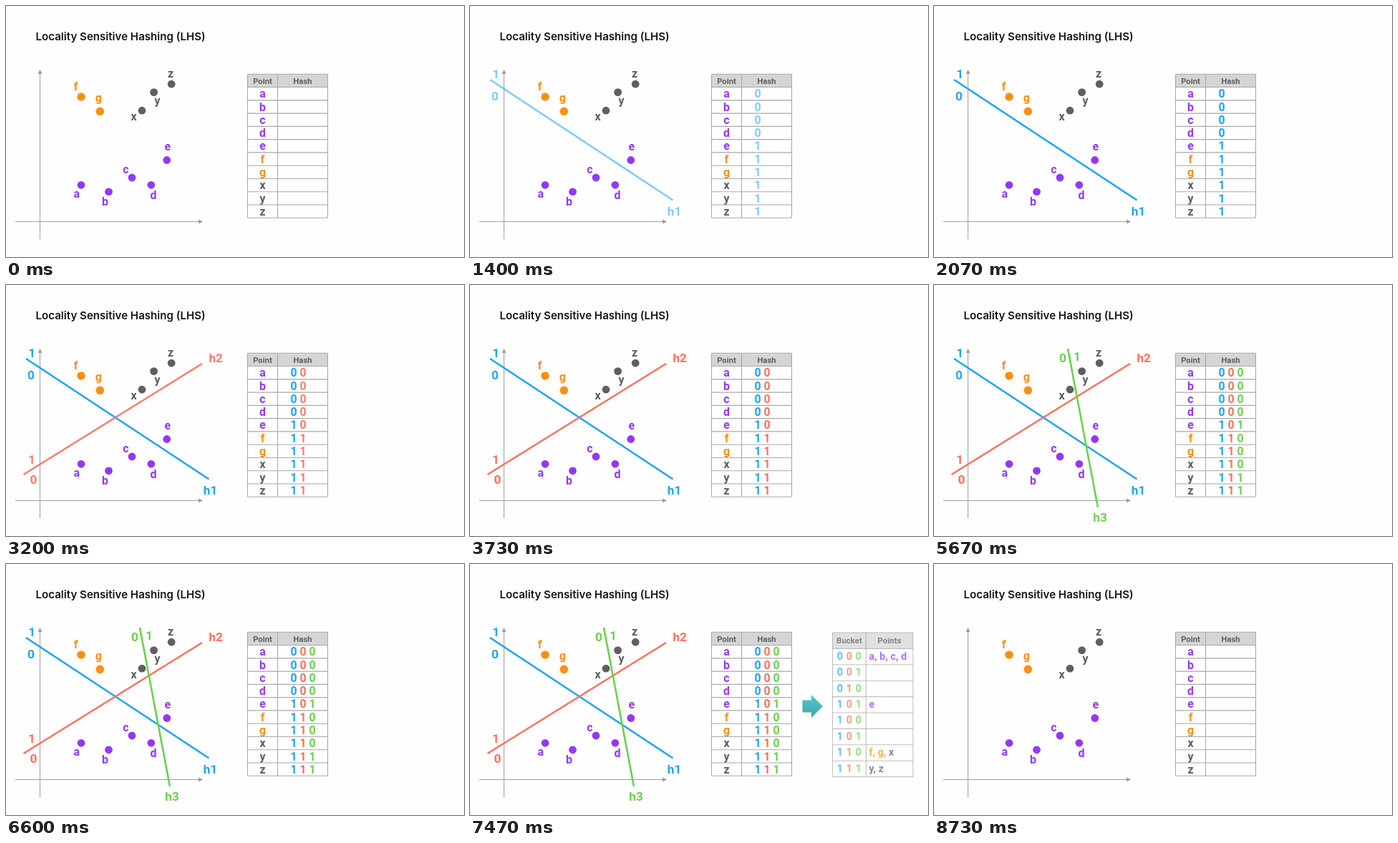
An HTML page with a canvas for the animation above (8790 ms loop, 640 by 351 pixels).

```html
<!DOCTYPE html>
<html lang="en">
<head>
<meta charset="utf-8">
<title>Locality Sensitive Hashing</title>
<style>
html, body { margin: 0; width: 100%; height: 100%; overflow: hidden; background: #fefefe; }
canvas { display: block; width: 640px; height: 351px; }
</style>
</head>
<body>
<canvas id="stage"></canvas>
<script>
const W = 640, H = 351, LOOP = 8790, RESET = 8715, FADE = 700;
const canvas = document.getElementById('stage');
const ctx = canvas.getContext('2d');
const dpr = window.devicePixelRatio || 1;
canvas.width = Math.round(W * dpr);
canvas.height = Math.round(H * dpr);

const PURPLE = '#9437f4', ORANGE = '#fa8f12', GRAY = '#5f5f5f';
const BLUE = '#1ea5f0', RED = '#f87261', GREEN = '#6bd04f';
const RULE = '#a8a8a8', AXIS = '#9e9e9e';

// name, dot x, dot y, label x, label baseline, colour
const points = [
  ['a', 105, 250.3, 98.7, 267.5, PURPLE],
  ['b', 143.5, 259.8, 138.5, 278.5, PURPLE],
  ['c', 176, 240, 167.5, 233.7, PURPLE],
  ['d', 202.8, 250.3, 206, 270, PURPLE],
  ['e', 224.8, 215.5, 225.8, 201.7, PURPLE],
  ['f', 105, 127, 97.5, 118, ORANGE],
  ['g', 131.3, 147.3, 129.3, 134.4, ORANGE],
  ['x', 190, 146.2, 178.5, 159.5, GRAY],
  ['y', 206.6, 120.6, 211.5, 138, GRAY],
  ['z', 231.2, 109.2, 230, 100.3, GRAY]
];

const planes = [
  { start: 1020, color: BLUE, line: [28, 103, 283.5, 271.5], bits: '0000111111',
    labels: [['1', 36.2, 101], ['0', 35, 131.5], ['h1', 285.5, 293.2]] },
  { start: 2620, color: RED, line: [24.5, 265, 274, 110], bits: '0000011111',
    labels: [['1', 36, 250.3], ['0', 38.5, 278.3], ['h2', 293.2, 108.2]] },
  { start: 5020, color: GREEN, line: [187, 89, 229, 311], bits: '0000100011',
    labels: [['0', 180, 108.3], ['1', 200, 106.2], ['h3', 232, 331.2]] }
];

const BUCKET_START = 7020;
const buckets = ['000', '001', '010', '101', '100', '101', '110', '111'];
const members = {
  0: [['a, b, c, d', PURPLE]],
  3: [['e', PURPLE]],
  6: [['f, g, ', ORANGE], ['x', GRAY]],
  7: [['y, z', GRAY]]
};

function fade(t, start) {
  const p = Math.min(1, Math.max(0, (t - start) / FADE));
  return p * p * (3 - 2 * p);
}

function text(str, x, y, size, color, weight = 700, align = 'center', family = 'Roboto') {
  ctx.font = `${weight} ${size}px ${family}, sans-serif`;
  ctx.textAlign = align;
  ctx.fillStyle = color;
  ctx.fillText(str, x, y);
}

function line(x1, y1, x2, y2, color, width) {
  ctx.strokeStyle = color;
  ctx.lineWidth = width;
  ctx.beginPath();
  ctx.moveTo(x1, y1);
  ctx.lineTo(x2, y2);
  ctx.stroke();
}

function shape(coords, fill) {
  ctx.fillStyle = fill;
  ctx.beginPath();
  coords.forEach(([x, y]) => ctx.lineTo(x, y));
  ctx.closePath();
  ctx.fill();
}

function grid(x, y, w, split, rows, rowH) {
  const h = rows * rowH;
  ctx.fillStyle = '#d5d5d5';
  ctx.fillRect(x, y, w, rowH);
  for (let i = 0; i <= rows; i++) line(x, y + i * rowH, x + w, y + i * rowH, RULE, 1.1);
  for (const cx of [x, split, x + w]) line(cx, y, cx, y + h, RULE, 1.1);
}

function drawAxes() {
  line(47.5, 93, 47.5, 326, AXIS, 1);
  line(13, 301.5, 271, 301.5, AXIS, 1);
  shape([[47.5, 89], [50.5, 95], [44.5, 95]], AXIS);
  shape([[275, 301.5], [269, 298.5], [269, 304.5]], AXIS);
}

const rowBase = i => 128.4 + i * 18.27;

function drawPlane(plane, col, alpha) {
  if (!alpha) return;
  ctx.globalAlpha = alpha;
  line(...plane.line, plane.color, 2.6);
  for (const [s, x, y] of plane.labels) text(s, x, y, 17.3, plane.color);
  [...plane.bits].forEach((b, i) => text(b, 402 + col * 13, rowBase(i), 16, plane.color));
  ctx.globalAlpha = 1;
}

function drawArrow() {
  const g = ctx.createLinearGradient(0, 183, 0, 216);
  g.addColorStop(0, '#10b2b4');
  g.addColorStop(0.5, '#00989e');
  g.addColorStop(1, '#007a82');
  shape([[464.5, 190.5], [477, 190.5], [477, 183], [493, 199],
    [477, 215], [477, 207.5], [464.5, 207.5]], g);
}

function drawBuckets(alpha) {
  if (!alpha) return;
  ctx.globalAlpha = alpha;
  drawArrow();
  grid(506.5, 96, 112.5, 553.5, 9, 22.4);
  text('Bucket', 530, 111.2, 11.5, GRAY);
  text('Points', 586, 111.2, 11.5, GRAY);
  buckets.forEach((code, i) => {
    const y = 134 + i * 22.36;
    planes.forEach((p, c) => text(code[c], 517 + c * 13, y, 14.4, p.color));
    let x = 557.5;
    for (const [s, color] of members[i] || []) {
      text(s, x, y, 14.4, color, 700, 'left');
      x += ctx.measureText(s).width;
    }
  });
  ctx.globalAlpha = 1;
}

function draw(t) {
  if (t >= RESET) t = 0;
  ctx.setTransform(dpr, 0, 0, dpr, 0, 0);
  ctx.fillStyle = '#fefefe';
  ctx.fillRect(0, 0, W, H);

  text('Locality Sensitive Hashing (LHS)', 41.5, 47.5, 15.1, '#151515', 600, 'left', 'Inter');
  drawAxes();
  grid(337.5, 95.3, 112, 379.5, 11, 18.27);
  text('Point', 358.5, 108.6, 11.3, GRAY);
  text('Hash', 414.5, 108.6, 11.3, GRAY);

  points.forEach(([name, x, y, lx, ly, color], i) => {
    ctx.fillStyle = color;
    ctx.beginPath();
    ctx.arc(x, y, color === ORANGE ? 5.8 : 5.4, 0, Math.PI * 2);
    ctx.fill();
    text(name, lx, ly, 16, color);
    text(name, 358.5, rowBase(i), 16, color);
  });

  planes.forEach((p, i) => drawPlane(p, i, fade(t, p.start)));
  drawBuckets(fade(t, BUCKET_START));
}

const began = performance.now();
function tick() {
  draw((performance.now() - began) % LOOP);
  requestAnimationFrame(tick);
}
tick();
</script>
</body>
</html>
```
